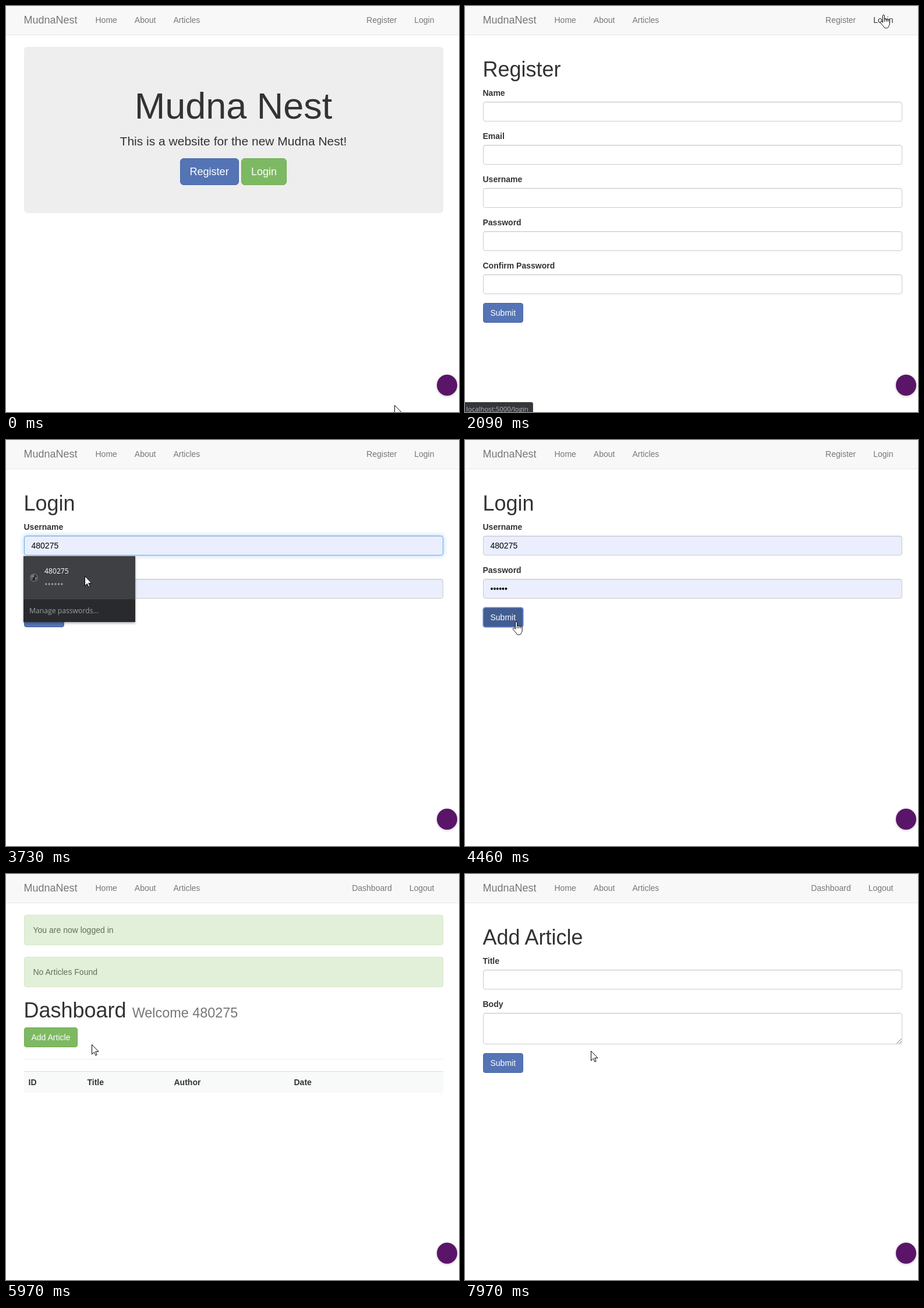
These frames come from a looping animation (778 by 696 pixels, 8 s). An HTML page:

```html
<!DOCTYPE html>
<html lang="en">
<head>
<meta charset="utf-8">
<title>Website walkthrough</title>
<style>
  html, body { margin: 0; width: 100%; height: 100%; overflow: hidden; background: #fff; }
  body { font: 14px/20px "Liberation Sans", Arial, sans-serif; color: #333; cursor: default; }
  #stage { position: absolute; left: 0; top: 0; width: 778px; height: 696px; overflow: hidden; background: #fff; }
  #stage * { box-sizing: border-box; }
  .at, .page { position: absolute; white-space: nowrap; }
  .page { inset: 0; }
  [hidden] { display: none !important; }

  .bar { left: 0; top: 0; width: 781px; height: 50px; background: #f8f8f8; border-bottom: 1px solid #e7e7e7; color: #777; }
  .brand { left: 30.5px; top: 14px; font-size: 18px; }
  .links { top: 14px; display: flex; gap: 30px; }
  .left { left: 153.5px; }
  .right { right: 45.5px; }
  .hot { color: #333; }

  .h1 { left: 30.5px; font-size: 36px; line-height: 39.6px; }
  .h1 small { font-size: 65%; color: #777; }
  .label { left: 30.5px; font-weight: bold; }
  .wide { left: 30.5px; width: 720px; }
  .field { height: 34px; padding: 6px 12px; border: 1px solid #ccc; border-radius: 4px; background: #fff;
           box-shadow: inset 0 1px 1px rgba(0,0,0,.075); color: #000; }
  .field.start { border-color: #b9bfcf; }
  .field.focus { border-color: #66afe9; box-shadow: inset 0 1px 1px rgba(0,0,0,.075), 0 0 8px rgba(102,175,233,.6); }
  .field.full { background: #eaeefd; }
  .caret { left: 44px; top: 173px; width: 1px; height: 16px; background: #000; }

  .btn { padding: 6px 12px; height: 34px; border: 1px solid #4866a5; border-radius: 4px; background: #5474b5; color: #fff; }
  .btn.green { background: #7db962; border-color: #6dab51; }
  .btn.big { height: 46px; padding: 10px 16px; border-radius: 6px; font-size: 18px; line-height: 24px; }
  .btn.hot { background: #425d91; border-color: #3a5383; color: #fff; }
  .btn.green.hot { background: #64a148; border-color: #5a9440; }
  .btn.ring { border-color: #6f87dc; box-shadow: 0 0 0 1px #a6b5ee; }

  .jumbo { top: 70px; height: 285px; border-radius: 6px; background: #eee; }
  .center { left: 30.5px; width: 720px; text-align: center; }
  .alert { height: 52px; padding: 15px; border: 1px solid #d4e8c6; border-radius: 4px; background: #e2f0d9; color: #5f6f5a; }

  .ui { font-family: "Open Sans", "Noto Sans", sans-serif; }
  #menu { left: 30px; top: 199px; width: 192px; height: 113px; background: #292a2d; color: #9aa0a6;
          font-size: 12.2px; box-shadow: 0 2px 4px rgba(0,0,0,.35); }
  #menu .row { left: 0; top: 0; width: 192px; height: 74px; border-bottom: 1px solid #414347; }
  #menu .row.hot { background: #3f4043; }
  #status { left: -1px; top: 679px; height: 19px; padding: 1px 7px 0 2px; border: 1px solid #4a4b4f;
            border-radius: 0 3px 0 0; background: #35363a; color: #b4b7bb; font-size: 11.4px; }
  .badge { left: 740px; top: 632px; width: 35px; height: 36px; border-radius: 50%; background: #5a1569;
           box-shadow: 0 1px 4px rgba(0,0,0,.25); }
  #pointer { left: 0; top: 0; width: 1px; height: 1px; overflow: visible; }
  #pointer path { stroke: #000; stroke-width: 1; fill: #fff; stroke-linejoin: round; }
</style>
</head>
<body>
<div id="stage"></div>
<script>
const LOOP = 8000, BRAND = "Mudna Nest", USER = "480275";
const stage = document.getElementById("stage");

const box = (cls, top, html = "", extra = "") =>
  `<div class="at ${cls}" style="top:${top}px" ${extra}>${html}</div>`;
const label = (top, text) => box("label", top, text);
const button = (top, text, cls = "", id = "") =>
  `<div class="at btn ${cls}" id="${id}" style="left:30.5px;top:${top}px">${text}</div>`;
const form = (title, names) => box("h1", 89.4, title) +
  names.map((n, i) => label(139 + i * 74, n) +
    box("wide field", 164 + i * 74, "", `id="${title}${i}"`)).join("");
const links = (side, names) => `<div class="at links ${side}">` +
  names.map(n => `<span id="nav${n}">${n}</span>`).join("") + "</div>";
const column = (x, text) =>
  `<b class="at" style="left:${x}px;top:347px">${text}</b>`;

const pages = {
  home: box("wide jumbo", 70) +
    box("center", 137, BRAND, "data-title") +
    box("center", 217, `This is a website for the new ${BRAND}!`, "data-lead") +
    `<div class="at btn big" id="join" style="left:298.6px;top:261px">Register</div>
     <div class="at btn big green" style="left:404px;top:261px">Login</div>`,
  register: form("Register", ["Name", "Email", "Username", "Password", "Confirm Password"]) +
    button(509, "Submit"),
  login: form("Login", ["Username", "Password"]) + button(287, "Submit", "", "send") +
    `<div class="at caret" id="caret"></div>
     <div class="at ui" id="menu">
       <div class="at row" id="entry">
         <svg class="at" style="left:11px;top:30px" width="14" height="14">
           <circle cx="7" cy="7" r="6.2" fill="#292a2d" stroke="#777b80" stroke-width="1.3"/>
           <path d="M2 4 5 2 8 3 7 6 4 7 5 10 3 10ZM9 6 12 6 11 10 9 11Z" fill="#777b80"/>
         </svg>
         <span class="at" style="left:36px;top:16px;color:#fff">${USER}</span>
         <svg class="at" style="left:36px;top:45px" width="36" height="6">
           ${[0, 1, 2, 3, 4, 5].map(i => `<circle cx="${2.8 + i * 5.4}" cy="3" r="1.7" fill="#9aa0a6"/>`).join("")}
         </svg>
       </div>
       <span class="at" style="left:10px;top:84px">Manage passwords...</span>
     </div>`,
  dashboard: box("wide alert", 70, "You are now logged in") +
    box("wide alert", 142, "No Articles Found") +
    box("h1", 214, `Dashboard <small>Welcome ${USER}</small>`) +
    button(263, "Add Article", "green", "add") +
    box("wide", 317, "", "data-rule") + box("wide", 338, "", "data-head") +
    column(38.5, "ID") + column(139.5, "Title") + column(288.5, "Author") + column(494.5, "Date"),
  article: form("Add Article", ["Title", "Body"]) + button(307, "Submit") +
    `<svg class="at" style="left:741px;top:282px" width="9" height="9">
       <path d="M0.5 8.5 8.5 0.5M5 8.5 8.5 5" stroke="#6f6a5a" fill="none"/></svg>`
};

stage.innerHTML =
  `<div class="at bar"><span class="at brand">${BRAND.replace(" ", "")}</span>` +
  links("left", ["Home", "About", "Articles"]) +
  `<div id="guest">${links("right", ["Register", "Login"])}</div>
   <div id="member">${links("right", ["Dashboard", "Logout"])}</div></div>` +
  Object.entries(pages).map(([k, v]) => `<div class="page" id="${k}">${v}</div>`).join("") +
  `<div class="at ui" id="status"></div><div class="at badge"></div>
   <svg class="at" id="pointer">
     <circle id="click" cx="-2" cy="0" r="12" fill="#fcf87c"/>
     <path id="arrow" d="M.5.5V17L4.4 13.3 6.9 19 9.2 18 6.8 12.4H12Z"/>
     <path id="hand" transform="translate(-6.8 -.5)" d="M5.3 13.5V2.3a1.5 1.5 0 0 1 3 0V8.8c.3-1.4 3-1.2 3 .3.3-1.3 2.8-1.1 2.8.5.4-1.1 2.9-.9 2.9.9V16c0 2.6-1.6 3.6-2 5.6-1 2.4-6.6 2.4-7.4.2C6.6 19.4 2.4 16.4 1.2 13.9c-.7-1.6 1.6-2.7 2.8-1.4ZM8.3 8.8V12.3M11.3 9V12.3M14.1 9.6V12.5"/>
     <path id="ibeam" style="fill:none" d="M-3-7.5H-1L.5-6.5 2-7.5H4M.5-6.5V7M-3 8H-1L.5 7 2 8H4"/>
   </svg>`;

const $ = id => document.getElementById(id);
Object.assign(stage.querySelector("[data-title]").style, { fontSize: "63px", lineHeight: "69.3px" });
Object.assign(stage.querySelector("[data-lead]").style, { fontSize: "21px", lineHeight: "30px" });
stage.querySelector("[data-rule]").style.borderTop = "1px solid #eee";
Object.assign(stage.querySelector("[data-head]").style,
  { height: "37px", background: "#f8f9f9", borderTop: "1px solid #ddd" });
$("Add Article1").style.height = "54px";

// The screen refreshes in bursts: start, end, number of refreshes.
const steps = [0].concat(...[
  [70, 820, 8], [1050, 1740, 7], [1860, 2090, 3], [2440, 3160, 7], [3270, 3970, 7], [4100, 4800, 7],
  [4940, 5740, 8], [5850, 5970, 2], [6220, 6440, 3], [6920, 7720, 8], [7850, 7970, 2]
].map(([a, b, n]) => Array.from({ length: n }, (_, i) => a + (b - a) * i / (n - 1))));

// Pointer path: time, x, y.
const path = [
  [0, 667, 684], [490, 372, 291], [600, 365, 285], [940, 365, 285], [1280, 196, 461], [1395, 240, 425],
  [1740, 718, 20], [1860, 718.5, 15], [2560, 718.5, 15], [3160, 252, 191.5], [3270, 252, 191.5],
  [3503, 160, 226], [3737, 110, 239], [3970, 110, 239], [4330, 87.5, 311], [5169, 87.5, 311],
  [5740, 144.5, 293], [5970, 147, 292], [6110, 147, 292], [6440, 201, 302], [6800, 201, 302],
  [7263, 112, 284], [7491, 112, 284], [7720, 140, 306], [7970, 216, 303]
];
const shapes = [[0, "arrow"], [490, "hand"], [1050, "arrow"], [1160, "ibeam"], [1390, "arrow"], [1500, "ibeam"],
  [1620, "arrow"], [1740, "hand"], [2680, "arrow"], [3150, "ibeam"], [3500, "arrow"], [4100, "ibeam"],
  [4210, "hand"], [5280, "arrow"], [7140, "hand"], [7600, "arrow"]];
const views = [[0, "home"], [700, "register"], [2560, "login"], [5050, "dashboard"], [7480, "article"]];
const notes = [[0, ""], [490, "localhost:5000/register"], [700, ""], [1860, "localhost:5000/login"], [2680, ""],
  [4560, "Waiting for localhost..."], [5160, ""], [7140, "localhost:5000/add_article"], [7600, ""]];

const latest = (list, t) => list.filter(e => e[0] <= t).pop()[1];
const during = (t, a, b) => t >= a && t < b;
const show = (id, on) => { $(id).hidden = !on; };
const flag = (id, cls, on) => $(id).classList.toggle(cls, on);

function place(t) {
  const i = path.findIndex(p => p[0] > t);
  if (i < 0) return path[path.length - 1].slice(1);
  const [a, b] = [path[i - 1], path[i]], k = (t - a[0]) / (b[0] - a[0]);
  return [a[1] + (b[1] - a[1]) * k, a[2] + (b[2] - a[2]) * k];
}

function draw(now) {
  const t = steps.filter(s => s <= now + 0.5).pop();
  const view = latest(views, t), shape = latest(shapes, t), note = latest(notes, t);

  for (const id in pages) $(id).style.display = id === view ? "" : "none";
  for (const id of ["arrow", "hand", "ibeam"]) $(id).style.display = id === shape ? "" : "none";
  show("guest", t < 5050);
  show("member", t >= 5050);
  show("status", note);
  $("status").textContent = note;

  flag("join", "hot", during(t, 490, 700));
  flag("navLogin", "hot", during(t, 1730, 2560));
  flag("add", "hot", during(t, 7140, 7480));
  flag("send", "hot", t >= 4210);
  flag("send", "ring", t >= 4330);

  const full = t >= 3500;
  flag("Login0", "start", during(t, 3270, 3380));
  flag("Login0", "focus", during(t, 3380, 4330));
  for (const id of ["Login0", "Login1"]) flag(id, "full", full);
  $("Login0").textContent = full ? USER : "";
  $("Login1").textContent = full ? "\u2022".repeat(6) : "";
  show("caret", during(t, 3270, 3500));
  show("menu", during(t, 3270, 3960));
  flag("entry", "hot", full);

  const clicked = [600, 3270, 3850, 4330, 7370].some(c => during(t, c, c + 105));
  $("click").style.display = clicked ? "" : "none";
  const [x, y] = place(t).map(Math.round);
  $("pointer").style.transform = `translate(${x}px,${y}px)`;
}

const begin = performance.now();
(function tick() {
  draw((performance.now() - begin) % LOOP);
  requestAnimationFrame(tick);
})();
</script>
</body>
</html>
```
